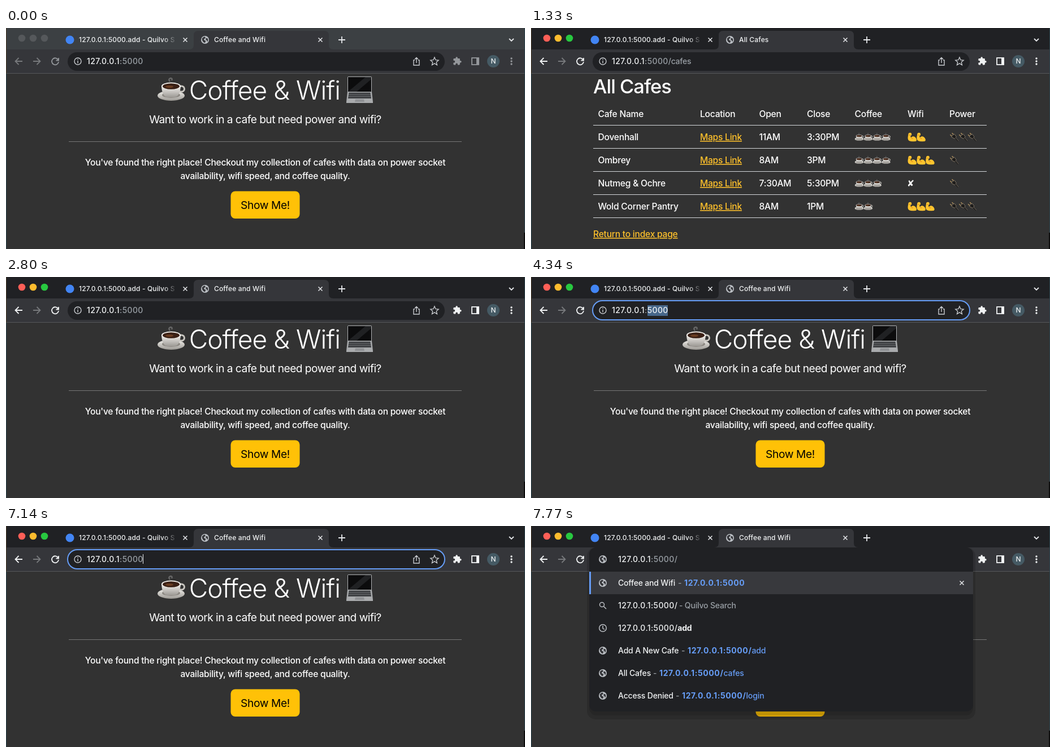
These frames come from a looping animation (918x392 px, 8 s). An HTML page:

```html
<!DOCTYPE html>
<html lang="en">
<head>
<meta charset="utf-8">
<title>Coffee and Wifi</title>
<style>
html, body { margin: 0; width: 100%; height: 100%; overflow: hidden; background: #323232; }
svg { display: block; --icon: #f1f3f4; --back: #77797c; --strip: #202124; }
svg.inactive { --icon: #94979b; --strip: #3c4043; }
text { font: 450 14px Inter, sans-serif; fill: #f1f3f4; white-space: pre; }
.tab { font-size: 12px; letter-spacing: .15px; }
.url { letter-spacing: .38px; }
.item { letter-spacing: -.18px; }
.dim { fill: #9aa0a6; }
.path { letter-spacing: -.25px; }
.link { font-weight: 700; fill: #669df6; letter-spacing: .6px; }
.link tspan { font-weight: 450; letter-spacing: -.1px; }
.page text { fill: #fff; font-size: 15.6px; letter-spacing: -.24px; }
.page .anchor { fill: #ffc12b; text-decoration: underline; }
.page .title { font-size: 46px; font-weight: 300; letter-spacing: -.95px; }
.page .lead { font-size: 19.2px; font-weight: 400; letter-spacing: -.55px; }
.page .heading { font-size: 34.5px; font-weight: 500; letter-spacing: -1px; }
.page .button { fill: #000; font-size: 19.2px; font-weight: 400; letter-spacing: -.4px; }
.mid text { text-anchor: middle; }
.line { fill: none; stroke: var(--icon); stroke-width: 1.8; }
.fill { fill: var(--icon); }
.strip { fill: var(--strip); }
.thin { fill: none; stroke: #e4e6e9; stroke-width: 1.5; }
</style>
</head>
<body>
<svg id="stage" width="918" height="392" viewBox="0 0 918 392">
  <defs>
    <linearGradient id="fade">
      <stop style="stop-color: var(--strip)" stop-opacity="0"/>
      <stop offset=".75" style="stop-color: var(--strip)"/>
    </linearGradient>
    <linearGradient id="china" x2="0" y2="1"><stop stop-color="#f4f2ee"/><stop offset="1" stop-color="#9c9994"/></linearGradient>
    <path id="close" d="M-3.5-3.5 3.5 3.5M3.5-3.5-3.5 3.5"/>
    <g id="dots"><circle cx="28" cy="18" r="6.3"/><circle cx="48" cy="18" r="6.3"/><circle cx="68" cy="18" r="6.3"/></g>
    <g id="globe">
      <circle r="7" fill="#bdc1c6"/>
      <path fill="#35363a" d="M-5.4-2Q-3-6 0-5.5L1-3-2-1.5-1 1 1.5 1.5 0 5.5Q-5 4-5.4-2ZM2.5-3.5 5-2Q6.2 1 4 3.8L3 .8.8-.8Z"/>
    </g>
    <symbol id="cup" viewBox="0 0 50 50">
      <path d="M22 11q-4-4 1-6 4 0 2 4" fill="none" stroke="#888" stroke-width="2.5" opacity=".6"/>
      <ellipse cx="24" cy="36" rx="24" ry="9" fill="url(#china)"/>
      <ellipse cx="24" cy="35" rx="16" ry="5" fill="#8d8983"/>
      <ellipse cx="42" cy="24" rx="5.5" ry="5" fill="none" stroke="#c9c6c0" stroke-width="3"/>
      <path d="M7 19Q8 38 18 39H30Q40 37 41 19Z" fill="url(#china)"/>
      <ellipse cx="24" cy="19" rx="17" ry="6.5" fill="#f3f1ed"/>
      <ellipse cx="24" cy="19.5" rx="15" ry="5.2" fill="#3a2015"/>
      <ellipse cx="21" cy="20" rx="7" ry="2" fill="#6a3d22"/>
    </symbol>
    <symbol id="laptop" viewBox="0 0 50 50">
      <rect x="4" y="1" width="43" height="29" rx="2" fill="#b0b2b4"/>
      <path d="M5 2H46V28H5Z" fill="#0c0c0d"/>
      <path d="M5 28 36 2H46V6L20 28Z" fill="#202123"/>
      <path d="M4 28H47L49 46V48H2V46Z" fill="#a9abad"/>
      <path d="M6.5 29.5H44.5L46 40H5Z" fill="#3e4043"/>
      <path d="M6 33H45M5.5 36.5H45.5" stroke="#85878a" stroke-width=".6"/>
      <path d="M18 41.5H33L34 46H17Z" fill="#8f9194"/>
    </symbol>
    <symbol id="arm" viewBox="0 0 50 50">
      <path d="M5 6Q13-1 21 5L22 15 16 19 18 29Q24 21 32 22 46 25 49 42L46 48Q28 53 10 46 0 42 2 25Z" fill="#ffc42e"/>
      <path d="M18 29Q22 35 29 33M8 16 16 14" fill="none" stroke="#d87d12" stroke-width="3"/>
    </symbol>
    <symbol id="plug" viewBox="0 0 50 50">
      <path d="M4 13 14 21M14 4 23 13" stroke="#b3935f" stroke-width="4"/>
      <path d="M10 24 26 9 37 23 34 31 26 34Z" fill="#1c1b1a" stroke="#85796a" stroke-width="3"/>
      <path d="M32 30Q40 37 47 47" fill="none" stroke="#1c1b1a" stroke-width="6"/>
      <path d="M34 29Q42 36 49 46" fill="none" stroke="#85796a" stroke-width="2.5"/>
    </symbol>
  </defs>

  <rect width="918" height="392" fill="#323232"/>

  <g id="home" class="page">
    <use href="#cup" x="268" y="84" width="50" height="50"/>
    <text class="title" x="323.7" y="127">Coffee &amp; Wifi</text>
    <use href="#laptop" x="600" y="85" width="50" height="50"/>
    <path d="M111 201.5H806" stroke="#777"/>
    <rect x="397.5" y="289.5" width="122" height="48.5" rx="8" fill="#ffc107"/>
    <g class="mid">
      <text class="lead" x="458.5" y="169">Want to work in a cafe but need power and wifi?</text>
      <text x="458.5" y="244">You've found the right place! Checkout my collection of cafes with data on power socket</text>
      <text x="458.5" y="268">availability, wifi speed, and coffee quality.</text>
      <text class="button" x="458.5" y="321">Show Me!</text>
    </g>
  </g>

  <g id="cafes" class="page">
    <text class="heading" x="110" y="116">All Cafes</text>
    <path d="M110 172.5H806m-696 41H806m-696 41H806m-696 41H806m-696 41H806" stroke="#d5d8db"/>
    <g id="table"></g>
    <text class="anchor" x="110" y="371">Return to index page</text>
  </g>

  <rect class="strip" width="918" height="39"/>
  <rect y="38" width="918" height="42" fill="#35363a"/>
  <path d="M324 38Q332 38 332 30V13Q332 5 340 5H563Q571 5 571 13V30Q571 38 579 38Z" fill="#35363a"/>
  <path d="M0 80.5H918" stroke="#55575a"/>
  <g id="lights"><circle cx="28" cy="18" r="6.3" fill="#ff5f57"/><circle cx="48" cy="18" r="6.3" fill="#febc2e"/><circle cx="68" cy="18" r="6.3" fill="#28c840"/></g>
  <use id="dimLights" href="#dots" fill="#55585b"/>

  <circle cx="113" cy="21" r="7.5" fill="#4285f4"/>
  <text class="tab" x="129" y="25">127.0.0.1:5000.add - Quilvo S</text>
  <rect x="278" y="8" width="32" height="26" fill="url(#fade)"/>
  <use href="#globe" x="352" y="21"/>
  <text class="tab" id="tabTitle" x="368" y="25"></text>
  <g class="thin">
    <use href="#close" x="317" y="21"/>
    <use href="#close" x="556" y="21"/>
    <path stroke-width="1.8" d="M588 21H600M594 15V27M890 19 894 23 898 19"/>
  </g>
  <g class="line">
    <path d="M92.2 56.2A6 6 0 1 0 93 60M93 53V57.5H88.5"/>
    <rect x="824" y="53" width="12" height="12"/>
    <path stroke="var(--back)" d="M29 59H17M22.5 53 16.5 59 22.5 65"/>
    <path stroke="#77797c" d="M48 59H60M54.5 53 60.5 59 54.5 65"/>
  </g>
  <g class="fill">
    <path d="M832 53H837V65H832Z"/>
    <path transform="translate(790 50.5) scale(.68)" d="M20.5 11H19V7c0-1.1-.9-2-2-2h-4V3.5a2.5 2.5 0 0 0-5 0V5H4c-1.1 0-2 .9-2 2v3.8h1.5a2.7 2.7 0 0 1 0 5.4H2V20c0 1.1.9 2 2 2h3.8v-1.5a2.7 2.7 0 0 1 5.4 0V22H17c1.1 0 2-.9 2-2v-4h1.5a2.5 2.5 0 0 0 0-5z"/>
    <circle cx="894" cy="54" r="1.7"/><circle cx="894" cy="59" r="1.7"/><circle cx="894" cy="64" r="1.7"/>
  </g>
  <circle cx="862" cy="59" r="11" fill="#455a64"/>
  <text class="tab" x="862" y="63.3" text-anchor="middle">N</text>

  <rect x="109" y="43" width="667" height="33" rx="16.5" fill="#202124"/>
  <rect id="ring" x="109" y="42" width="667" height="34" rx="17" fill="none" stroke="#669df6" stroke-width="2"/>
  <g fill="none" stroke="#c8cbcf" stroke-width="1.4">
    <circle cx="127" cy="59" r="6"/>
    <path d="M127 58V62.5M127 55V56.5"/>
    <path d="M723 57H721V66H731V57H729M726 62V53M723 55.5 726 52.5 729 55.5"/>
    <path transform="translate(749.8 50.6) scale(.68)" stroke-width="2" d="M12 2l3 7 7.5.7-5.7 5 1.7 7.3-6.5-3.9-6.5 3.9 1.7-7.3-5.7-5 7.5-.7z"/>
  </g>
  <rect id="selection" y="50" height="19" fill="#47678a"/>
  <text class="url" x="143" y="64">127.0.0.1<tspan id="colon" class="dim">:</tspan><tspan id="port" class="dim">5000</tspan><tspan id="path" class="dim path">/cafes</tspan></text>

  <g id="dropdown">
    <rect x="99" y="38" width="687" height="305" rx="15" opacity=".14"/>
    <rect x="103" y="38" width="679" height="298" rx="13" opacity=".12"/>
    <rect x="103" y="38" width="679" height="291" rx="12" fill="#202124"/>
    <rect x="103" y="81" width="679" height="40" fill="#38393d"/>
    <rect x="103" y="81" width="3" height="40" fill="#669df6"/>
    <use href="#close" class="thin" x="762" y="101"/>
    <use href="#globe" x="127" y="59"/>
    <text class="url" x="154" y="64">127.0.0.1<tspan class="dim">:5000/</tspan></text>
    <g id="suggestions"></g>
    <g fill="none" stroke="#bdc1c6" stroke-width="1.5">
      <circle cx="125.5" cy="139.5" r="4"/><path d="M128.5 142.5 133 147"/>
      <circle cx="127" cy="181" r="6.3"/><path d="M127 177V181.5L130 183.5"/>
    </g>
    <text class="url" x="154" y="146">127.0.0.1:5000/</text>
    <text class="item dim" x="262" y="146">- Quilvo Search</text>
    <text class="url" x="154" y="186">127.0.0.1:5000/<tspan class="item" font-weight="700">add</tspan></text>
  </g>
  <rect id="caret" y="50" width="1" height="17" fill="#e8eaed"/>
  <path d="M.5 0V81" stroke="#4a3d2c"/>
  <path d="M.5 81V392M917.5 0V363" stroke="#2b434c"/>
  <path d="M917 363V392" stroke="#0c0c0c" stroke-width="2"/>
</svg>
<script>
const $ = id => document.getElementById(id);
const show = (id, on) => $(id).setAttribute('display', on ? 'inline' : 'none');
const label = (x, y, content, cls = '') => `<text class="${cls}" x="${x}" y="${y}">${content}</text>`;
const icons = (name, x, y, count) => Array.from({ length: count }, (_, i) =>
  `<use href="#${name}" x="${x + i * 15.8}" y="${y}" width="16.5" height="16.5"/>`).join('');

const columns = [118.5, 299, 403.5, 488, 572.5, 666, 740];
const cafes = [
  ['Dovenhall', '11AM', '3:30PM', 4, 2, 3],
  ['Ombrey', '8AM', '3PM', 4, 3, 1],
  ['Nutmeg &amp; Ochre', '7:30AM', '5:30PM', 3, 0, 1],
  ['Wold Corner Pantry', '8AM', '1PM', 2, 3, 3],
];
$('table').innerHTML =
  ['Cafe Name', 'Location', 'Open', 'Close', 'Coffee', 'Wifi', 'Power']
    .map((name, i) => label(columns[i], 158, name)).join('') +
  cafes.map(([name, open, close, coffee, wifi, power], row) => {
    const y = 199 + row * 41, top = y - 14;
    return label(columns[0], y, name) + label(columns[1], y, 'Maps Link', 'anchor') +
      label(columns[2], y, open) + label(columns[3], y, close) +
      icons('cup', columns[4], top, coffee) + icons('plug', columns[6], top, power) +
      (wifi ? icons('arm', columns[5], top, wifi)
            : `<text x="${columns[5] - 1}" y="${y}" style="font-family:'DejaVu Sans',sans-serif">✘</text>`);
  }).join('');

const suggestions = [
  [101, 'Coffee and Wifi', 271, ''],
  [221, 'Add A New Cafe', 277, '/<tspan>add</tspan>'],
  [261, 'All Cafes', 227, '/<tspan>cafes</tspan>'],
  [301, 'Access Denied', 267, '/<tspan>login</tspan>'],
];
$('suggestions').innerHTML = suggestions.map(([y, title, x, path]) =>
  `<use href="#globe" x="127" y="${y}"/>` + label(154, y + 5, title, 'item') +
  label(x - 11, y + 5, '-', 'dim') + label(x, y + 5, '127.0.0.1:5000' + path, 'link')).join('');

function render(t) {
  const within = (from, to) => t >= from && t < to;
  const active = t >= 700, onCafes = within(1260, 2800), open = t >= 7280;
  const allSelected = within(3850, 4340) || within(4480, 4900);
  const selected = within(3850, 6090);

  $('stage').classList.toggle('inactive', !active);
  $('stage').style.setProperty('--back', t >= 1260 ? '#f1f3f4' : '#77797c');
  show('lights', active);
  show('dimLights', !active);
  show('home', !onCafes);
  show('cafes', onCafes);
  show('path', onCafes);
  $('tabTitle').textContent = onCafes ? 'All Cafes' : 'Coffee and Wifi';

  show('ring', t >= 3850 && !open);
  show('selection', selected);
  $('selection').setAttribute('x', allSelected ? 143 : 206);
  $('selection').setAttribute('width', allSelected ? 99 : 36);
  $('colon').classList.toggle('dim', !allSelected);
  $('port').classList.toggle('dim', !selected);

  show('dropdown', open);
  show('caret', within(6090, 6580) || within(7140, 7770));
  $('caret').setAttribute('x', open ? 258 : 242);
}

function loop() {
  render(performance.now() % 8000);
  requestAnimationFrame(loop);
}
loop();
</script>
</body>
</html>
```
